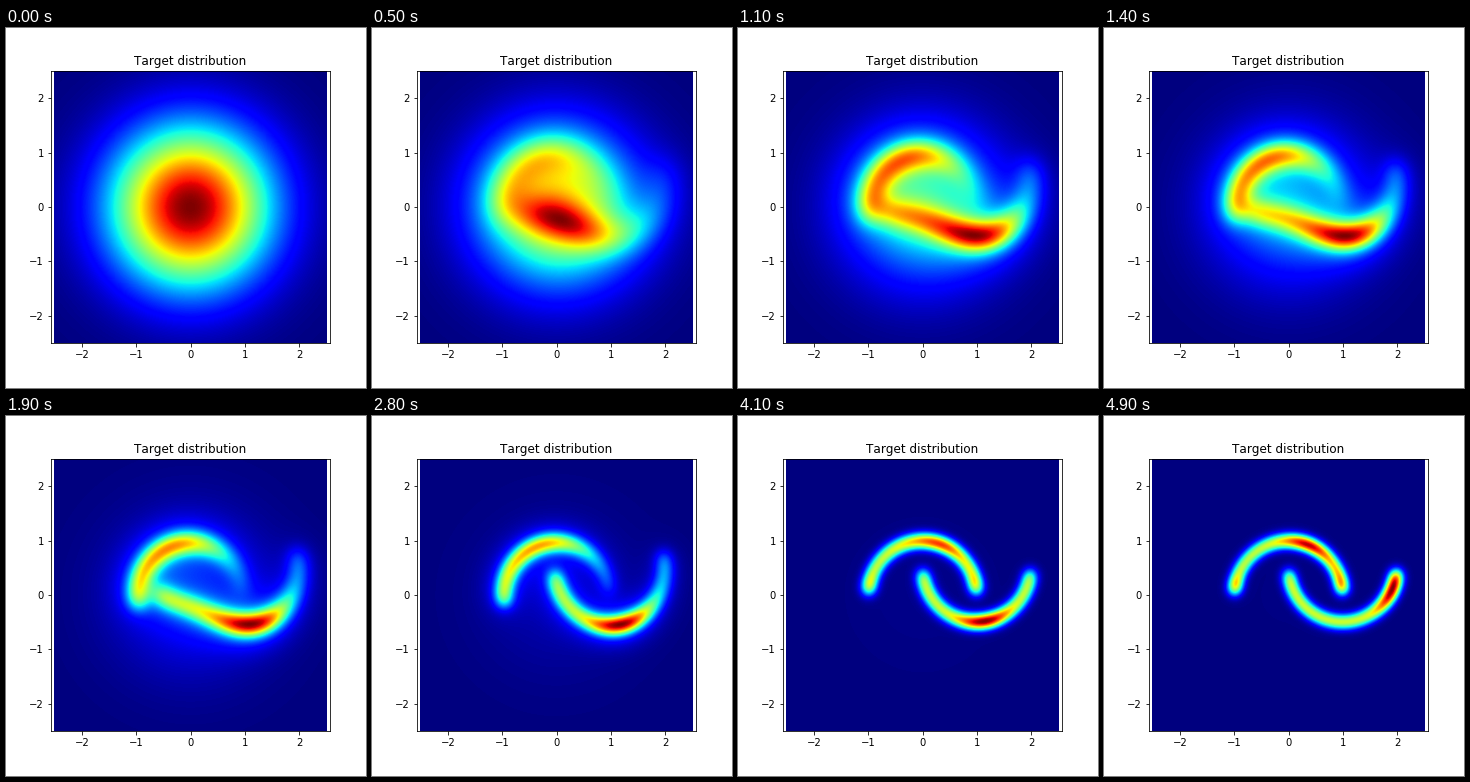
A matplotlib script that plays this animation: 360 px wide and 360 px high, repeating every 5 s.

```python
import numpy as np
import matplotlib.pyplot as plt
from matplotlib.animation import FuncAnimation

FRAMES = 50
INTERVAL = 100
LIMIT = 2.5
EDGE = 2.51  # the coloured area reaches slightly past the limits
AXIS = np.linspace(-EDGE, EDGE, 221)
X, Y = np.meshgrid(AXIS, AXIS)
U = np.linspace(0, 1, 90)  # position along a moon


def smooth(start, end, value):
    """Ease from 0 to 1 while value runs from start to end."""
    f = np.clip((value - start) / (end - start), 0, 1)
    return f * f * (3 - 2 * f)


def bump(center, width):
    return np.exp(-((U - center) / width) ** 2)


def ribbon(x, y, strength, width):
    """Soft band along a curve, built from overlapping Gaussians."""
    ds = np.hypot(np.gradient(x), np.gradient(y))
    weight = strength * ds / (width * np.sqrt(2 * np.pi))
    gx = np.exp(-(AXIS[:, None] - x) ** 2 / (2 * width ** 2))
    gy = np.exp(-(AXIS[:, None] - y) ** 2 / (2 * width ** 2))
    return (gy * weight) @ gx.T


def upper_moon(t):
    fade = 1 - smooth(2.5, 4.1, t)
    angle = np.pi + 0.25 * fade - 0.07 + U * (0.14 - np.pi - 0.25 * fade)
    radius = 1 - 0.03 * fade
    late = smooth(3, 4.9, t)
    strength = 0.55 + 0.15 * bump(0.42 + 0.22 * late, 0.22)
    strength += 0.25 * late * (bump(0, 0.08) + bump(0.62, 0.12) + bump(1, 0.12))
    strength *= 1 - 0.8 * fade * smooth(0.45, 1, U)
    return radius * np.cos(angle), radius * np.sin(angle), strength


def lower_moon(t):
    fade = 1 - smooth(2.5, 4.1, t)
    pull = 1 - smooth(1.5, 3, t)  # the inner tip first lies far to the left
    angle = 0.09 + U * (np.pi - 0.18 + 0.35 * fade)
    shift = pull * (1 - U) ** 3
    x = 1 - np.cos(angle) - 0.75 * shift
    y = 0.5 - (1 + 0.08 * fade) * np.sin(angle) - 0.4 * shift * np.cos(9 * U)
    hot = 0.27 + 0.24 * smooth(0.4, 1.2, t) + 0.39 * smooth(3.9, 4.9, t)
    base = 0.45 + 0.13 * smooth(1, 4.9, t)
    strength = base * (1 - 0.5 * fade * smooth(0.55, 0.9, U))
    strength += (1 - base) * bump(hot, 0.14 + 0.08 * np.exp(-t))
    return x, y, strength


def density(t):
    """A round cloud that condenses into two moons; peak scaled to 1."""
    cloud = np.exp(-t / 0.9)
    width = 0.095 + 0.25 * np.exp(-t / 1.3)
    halo = 0.2 * (1 - smooth(2.5, 4.1, t))
    z = cloud * np.exp(-(X ** 2 + Y ** 2) / 2)
    for moon in (upper_moon, lower_moon):
        x, y, strength = moon(t)
        z += (1 - cloud) * ((1 - halo) * ribbon(x, y, strength, width)
                            + halo * ribbon(x, y, strength, 2.2 * width))
    return z / z.max()


plt.rcParams["font.family"] = "DejaVu Sans"
plt.rcParams["text.kerning_factor"] = 6
fig = plt.figure(figsize=(5, 5), dpi=72)
ax = fig.add_axes([0.125, 0.125, 0.775, 0.755])
image = ax.imshow(density(0), extent=[-EDGE, EDGE, -EDGE, EDGE], origin="lower",
                  cmap="jet", vmin=0, vmax=1, interpolation="bilinear", aspect="auto")
half_width = LIMIT * 0.775 / 0.755
ax.set_xlim(-half_width, half_width)
ax.set_ylim(-LIMIT, LIMIT)
ax.set_xticks(range(-2, 3))
ax.set_yticks(range(-2, 3))
ax.set_title("Target distribution", fontsize=12)


def update(frame):
    image.set_data(density(frame * INTERVAL / 1000))
    return [image]


anim = FuncAnimation(fig, update, frames=FRAMES, interval=INTERVAL,
                     repeat=True, repeat_delay=0)
plt.show()
```
